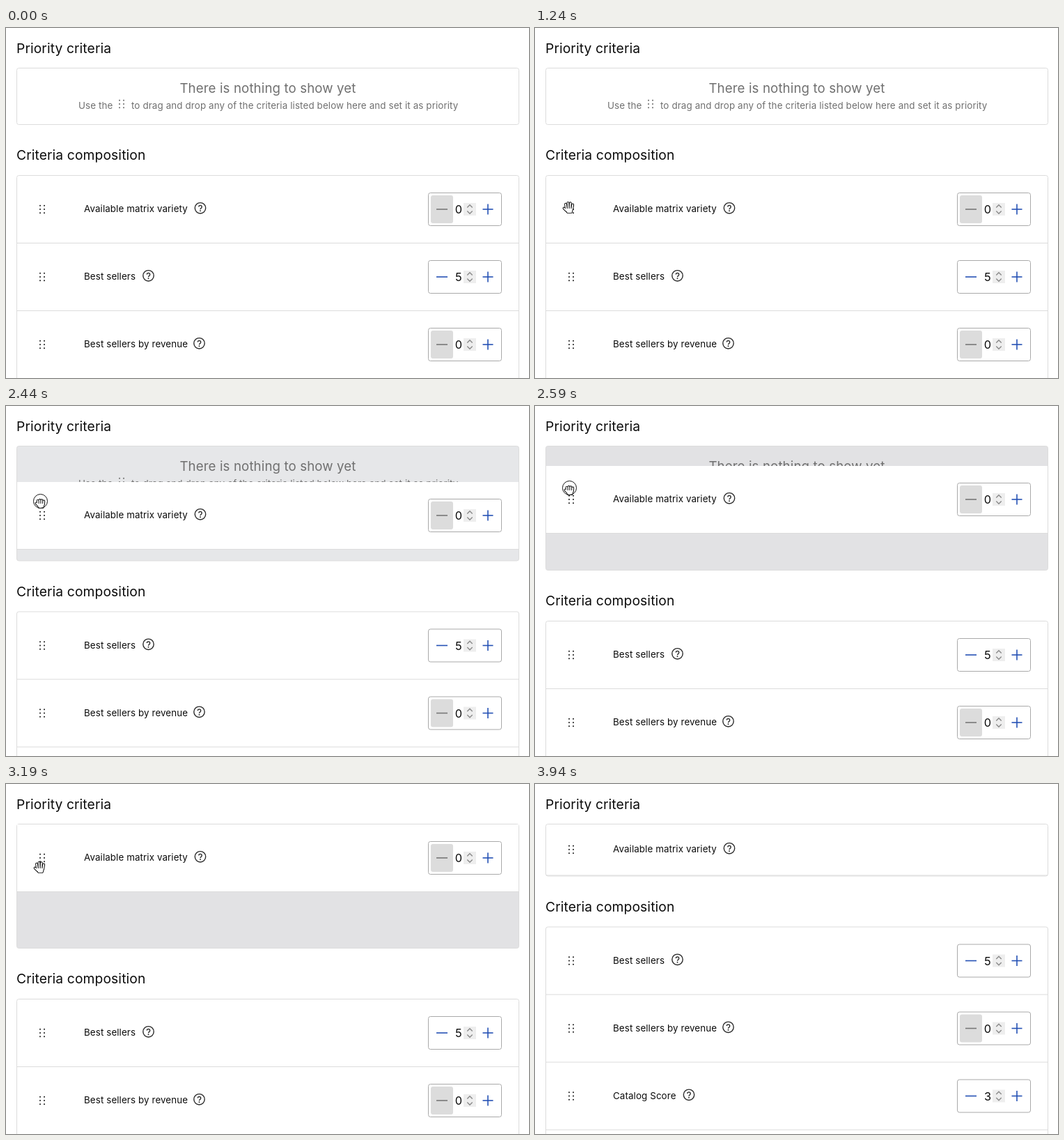
Write an HTML page with a canvas that moves like this. It is 751 px wide and 502 px high and loops after 8 s.

```html
<!DOCTYPE html>
<html lang="en">
<head>
<meta charset="utf-8">
<title>Priority criteria</title>
<style>
  html, body { margin: 0; width: 100%; height: 100%; overflow: hidden; background: #fff; }
  canvas { display: block; width: 751px; height: 502px; }
</style>
</head>
<body>
<canvas id="stage"></canvas>
<script>
const W = 751, H = 502, LOOP = 8000;
const ROW = 97, LIST_TOP = 212;
const LINE = '#dcdcdc', INK = '#0c0c0c', MUTED = '#707070', BLUE = '#2450b4';
const FONT = 'Inter, "Open Sans", sans-serif';

const canvas = document.getElementById('stage');
const ctx = canvas.getContext('2d');
const dpr = window.devicePixelRatio || 1;
canvas.width = W * dpr;
canvas.height = H * dpr;

const rows = [
  { label: 'Available matrix variety', help: 279, value: 0 },
  { label: 'Best sellers', help: 204.5, value: 5 },
  { label: 'Best sellers by revenue', help: 277.5, value: 0 },
  { label: 'Catalog Score', help: 221, value: 3 },
  { label: 'Discount', help: 190, value: 0 }
];

// Each step overrides part of the state and holds until the next one.
// top: dragged row, shift: content below the drop box, gap: rows closing up
const steps = [
  { at: 0, cursor: null, x: 0, y: 0, top: LIST_TOP, shift: 0, gap: 0, fill: null, edge: false, dropped: false },
  { at: 500, cursor: 'arrow', x: 13, y: 263 },
  { at: 650, x: 45, y: 257 },
  { at: 800, x: 47, y: 256 },
  { at: 1100, cursor: 'press', x: 48, y: 258 },
  { at: 1240, cursor: 'open' },
  { at: 1690, cursor: 'press' },
  { at: 1840, y: 256 },
  { at: 1990, y: 239 },
  { at: 2140, y: 222, top: 188, gap: -10 },
  { at: 2290, y: 182, top: 150, gap: -ROW },
  { at: 2440, y: 139, top: 109, shift: 83.5, fill: '#e6e7e9' },
  { at: 2590, y: 120, top: 86, shift: ROW, fill: '#e2e2e4' },
  { at: 2740, cursor: 'arrow', x: 47, y: 119, top: 81 },
  { at: 2890, top: 63, edge: true },
  { at: 3040, top: 58.5, edge: false },
  { at: 3190, cursor: 'open', x: 48, y: 120, top: 58 },
  { at: 3340, shift: -6.5, fill: null, dropped: true },
  { at: 3790, cursor: 'arrow', x: 13, y: 116 },
  { at: 3940, cursor: null }
];

function stateAt(t) {
  return Object.assign({}, ...steps.filter(s => s.at <= t));
}

function text(str, x, y, size, color = INK, align = 'left') {
  ctx.font = `${size}px ${FONT}`;
  ctx.letterSpacing = '0.11px';
  ctx.fillStyle = color;
  ctx.textAlign = align;
  ctx.fillText(str, x, y);
}

function box(x, y, w, h, r, fill, stroke) {
  ctx.beginPath();
  ctx.roundRect(x, y, w, h, r);
  if (fill) { ctx.fillStyle = fill; ctx.fill(); }
  if (stroke) { ctx.strokeStyle = stroke; ctx.lineWidth = 1; ctx.stroke(); }
}

function path(points, color, width) {
  ctx.beginPath();
  points.forEach(([x, y], i) => i ? ctx.lineTo(x, y) : ctx.moveTo(x, y));
  ctx.strokeStyle = color;
  ctx.lineWidth = width;
  ctx.stroke();
}

function handle(x, y, color) {
  ctx.fillStyle = color;
  for (const dx of [-3, 3]) {
    for (const dy of [-5.3, 0, 5.3]) {
      ctx.beginPath();
      ctx.arc(x + dx, y + dy, 1.05, 0, 7);
      ctx.fill();
    }
  }
}

function helpIcon(x, y) {
  ctx.strokeStyle = ctx.fillStyle = '#2b2b2b';
  ctx.lineWidth = 1.4;
  ctx.beginPath();
  ctx.arc(x, y, 7.7, 0, 7);
  ctx.stroke();
  ctx.beginPath();
  ctx.arc(x, y - 1.7, 2.2, Math.PI, Math.PI * 2.25);
  ctx.quadraticCurveTo(x, y + 0.6, x, y + 1.9);
  ctx.stroke();
  ctx.beginPath();
  ctx.arc(x, y + 4, 0.95, 0, 7);
  ctx.fill();
}

function stepper(y, value) {
  box(606.5, y - 23.5, 105, 47, 3, '#fff', '#a9a9a9');
  if (!value) box(610, y - 20, 32, 40, 3, '#dcdcdc');
  path([[618, y], [634, y]], value ? BLUE : '#767676', 1.6);
  text(value, 650, y + 6, 16.4, INK, 'center');
  box(657, y - 9, 18, 18, 0, '#eeeeee');
  for (const d of [-1, 1]) {
    path([[662.3, y + d * 2.6], [666, y + d * 6.2], [669.7, y + d * 2.6]], '#8a8a8a', 1.4);
  }
  path([[684.5, y], [699.5, y]], BLUE, 1.6);
  path([[692, y - 7.5], [692, y + 7.5]], BLUE, 1.6);
}

function row({ label, help, value }, top, compact) {
  const mid = top + (compact ? 36 : 48);
  handle(52, mid, '#222');
  text(label, 112, mid + 4, 13.35);
  helpIcon(help, mid - 1.7);
  if (!compact) stepper(mid, value);
  ctx.fillStyle = LINE;
  ctx.fillRect(16, top + (compact ? 72.5 : ROW - 1), 720, 1);
}

function dropBox({ shift, fill, dropped }) {
  text('Priority criteria', 15, 35.5, 19.25);
  box(15.5, 57.5, 721, 81 + shift, 3, fill || '#fff', LINE);
  if (dropped) return;
  text('There is nothing to show yet', 376, 93, 18.7, MUTED, 'center');
  text('Use the', 104, 115.5, 13.4, MUTED);
  handle(166, 109, MUTED);
  text('to drag and drop any of the criteria listed below here and set it as priority', 180, 115.5, 13.4, MUTED);
}

function arrow(x, y) {
  const pts = [[0, 0], [0, 14], [3.2, 11.1], [5.4, 16.2], [7.8, 15.2], [5.6, 10.2], [10, 10.2]];
  ctx.beginPath();
  pts.forEach(([px, py]) => ctx.lineTo(x + px, y + py));
  ctx.closePath();
  ctx.strokeStyle = '#fff';
  ctx.lineWidth = 2;
  ctx.stroke();
  ctx.fillStyle = '#000';
  ctx.fill();
}

function hand(x, y, fist) {
  const tips = fist ? [-3.2, -4, -3.8, -2.6] : [-5.4, -7.2, -6.9, -4.6];
  const lean = fist ? 0.1 : 0.6;
  const fingers = tips.map((tip, i) => {
    const base = -3.1 + i * 2.8;
    return [[base + (i - 1.5) * lean, tip], [base, 1.5]];
  });
  fingers.push(fist ? [[-5.2, 0.6], [-2.8, 3]] : [[-6.4, 0.6], [-2.8, 4]]);
  ctx.save();
  ctx.translate(x, y);
  ctx.lineCap = ctx.lineJoin = 'round';
  for (const [color, width] of [['#000', 3.8], ['#fff', 1.9]]) {
    fingers.forEach(f => path(f, color, width));
    ctx.beginPath();
    [[-3, 2], [5, 2], [3.8, 6.2], [-1, 6.2]].forEach(p => ctx.lineTo(...p));
    ctx.closePath();
    ctx.fillStyle = color;
    ctx.fill();
    ctx.stroke();
  }
  ctx.restore();
}

function drawCursor({ cursor, x, y }) {
  if (cursor === 'arrow') arrow(x, y);
  if (cursor === 'open') hand(x, y, false);
  if (cursor === 'press') {
    hand(x + 0.8, y, true);
    ctx.beginPath();
    ctx.arc(x + 1.5, y - 2.5, 10, 0, 7);
    ctx.strokeStyle = '#111';
    ctx.lineWidth = 1;
    ctx.stroke();
  }
}

function draw(t) {
  const s = stateAt(t);
  const [dragged, ...others] = rows;
  ctx.setTransform(dpr, 0, 0, dpr, 0, 0);
  ctx.fillStyle = '#fff';
  ctx.fillRect(0, 0, W, H);

  dropBox(s);
  text('Criteria composition', 15, 189 + s.shift, 19.25);
  box(15.5, LIST_TOP - 0.5 + s.shift, 721, H, 3, null, LINE);
  others.forEach((r, i) => row(r, LIST_TOP + (i + 1) * ROW + s.shift + s.gap));

  if (s.top !== LIST_TOP && !s.dropped) {
    ctx.fillStyle = '#fff';
    ctx.fillRect(16, s.top, 720, ROW);
  }
  row(dragged, s.top, s.dropped);
  if (s.edge) path([[286, s.top + 97.5], [736, s.top + 97.5]], '#777', 1);

  drawCursor(s);
}

const start = performance.now();
function tick() {
  draw((performance.now() - start) % LOOP);
  requestAnimationFrame(tick);
}
tick();
</script>
</body>
</html>
```
